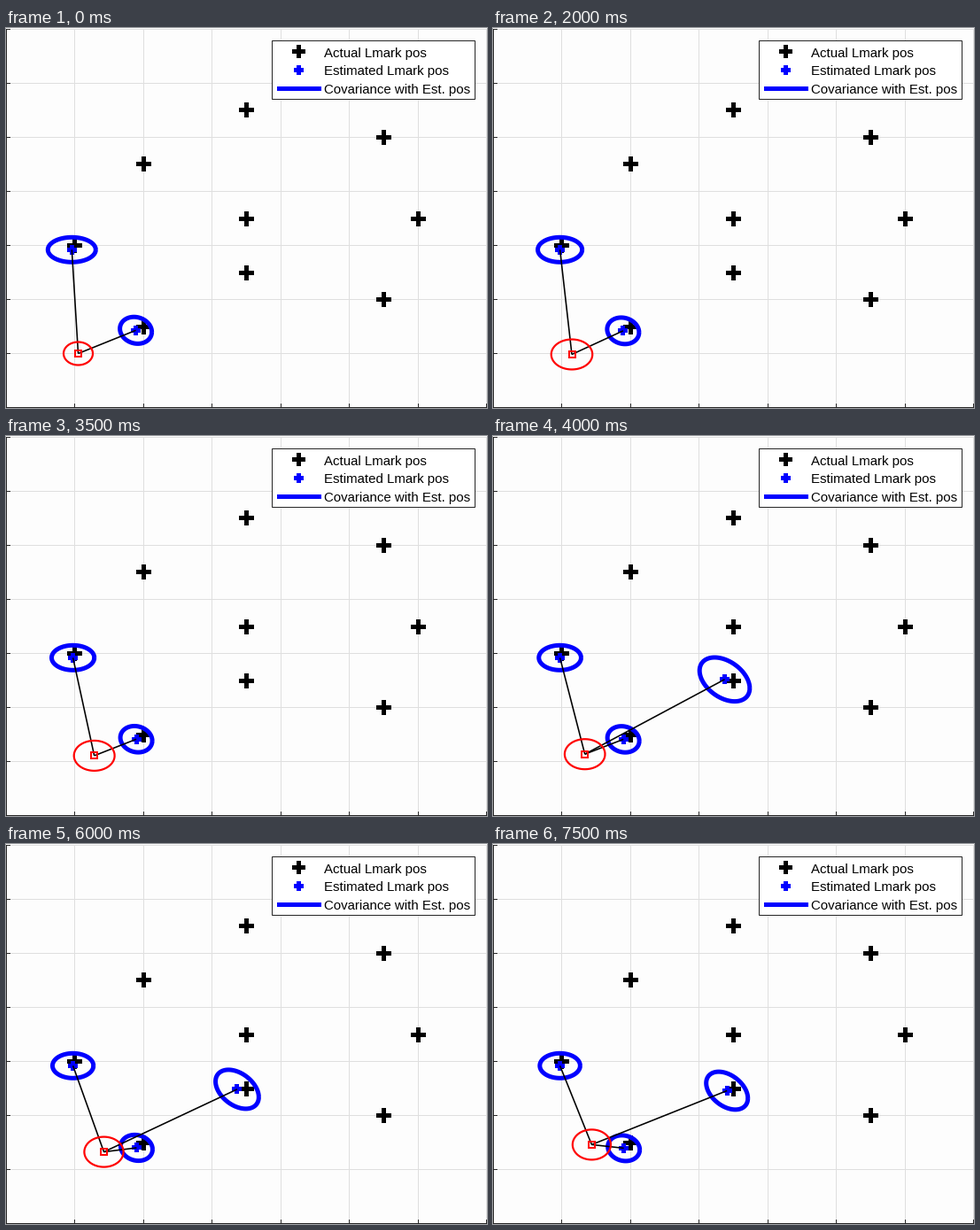
Animation, 543 px wide and 429 px high, one loop 8000 ms. Source, as a matplotlib script:

```python
import numpy as np
import matplotlib.pyplot as plt
from matplotlib.animation import FuncAnimation
from matplotlib.patches import Rectangle

W, H, DPI = 543, 429, 100
PX = 72 / DPI
FRAMES, INTERVAL = 16, 500
BLUE, RED, BLACK, GRID, FRAME = "#0000ff", "#ff0000", "#000000", "#dfdfdf", "#262626"

plt.rcParams["path.snap"] = False
fig = plt.figure(figsize=(W / DPI, H / DPI), dpi=DPI, facecolor="#fdfdfd")
ax = fig.add_axes([0, 0, 1, 1])
ax.set(xlim=(0, W), ylim=(H, 0))
ax.axis("off")


def line(xs, ys, color, width, z):
    return ax.plot(xs, ys, color=color, lw=width * PX, zorder=z,
                   solid_capstyle="butt", solid_joinstyle="miter")[0]


def to_px(u, v):
    """Pixel centre of a point given in grid cells from the top left."""
    return np.floor(77.5 * u) + 0.5, np.round(0.75 + 61.08 * v) + 0.5


def pluses(points, size):
    r, gap = size / 2, np.nan
    xs, ys = [], []
    for x, y in points:
        xs += [x - r, x + r, gap, x, x, gap]
        ys += [y, y, gap, y - r, y + r, gap]
    return xs, ys


def square(x, y, r=3.5):
    sx, sy = np.array([-r, r, r, -r, -r, r]), np.array([-r, -r, r, r, -r, -r])
    return x + sx, y + sy


def ellipse(cx, cy, hx, hy, r=0):
    """Ellipse with half extents hx, hy and correlation r."""
    a = np.linspace(0, 2 * np.pi, 121)
    return cx + hx * np.cos(a), cy + hy * (r * np.cos(a) + np.sqrt(1 - r * r) * np.sin(a))


def pixel(x, y):
    return np.floor(x) + 0.5, np.floor(y) + 0.5


# Grid, axis lines and ticks
for k in range(8):
    x, y = to_px(k, k)
    line([x, x], [1, H], GRID, 1, 1)
    line([0, W], [y, y], GRID, 1, 1)
    line([x, x], [H - 5, H], FRAME, 1, 2)
    line([0, 5], [y, y], FRAME, 1, 2)
line([0.5, 0.5], [1, H], FRAME, 1, 2)
line([0, W], [H - 0.5, H - 0.5], FRAME, 1, 2)

# Actual landmarks, in grid cells
landmarks = [(1, 4), (2, 2.5), (2, 5.5), (3.5, 1.5), (3.5, 3.5),
             (3.5, 4.5), (5.5, 2), (5.5, 5), (6, 3.5)]
line(*pluses([to_px(u, v) for u, v in landmarks], 17), BLACK, 5, 3)

# Legend
ax.add_patch(Rectangle((300.5, 14.5), 229, 66, fc="white", ec=FRAME,
                       lw=PX, zorder=10))
line(*pluses([(330.5, 26.5)], 15), BLACK, 5, 11)
line(*pluses([(330.5, 47.5)], 11), BLUE, 5, 11)
line([306, 356], [68.5, 68.5], BLUE, 5, 11)
labels = ["Actual Lmark pos", "Estimated Lmark pos", "Covariance with Est. pos"]
for label, y in zip(labels, (33, 53, 74)):
    ax.text(359, y, label, family="Liberation Sans", size=15 * PX,
            va="baseline", zorder=11)

# Robot waypoints: seconds, x, y
path_t = [0, 1, 2, 2.5, 4, 6, 7.5]
path_x = [81.5, 84.9, 89, 91.6, 103.7, 110.5, 111.4]
path_y = [367.5, 369.8, 368.5, 364.3, 359.2, 347.6, 339.4]


def robot_pose(t):
    return (np.interp(t, path_t, path_x), np.interp(t, path_t, path_y),
            24.2 - 7.7 * np.exp(-1.7 * t) - 0.35 * t,
            17 - 4 * np.exp(-2.5 * t))


# Estimates settle as they are observed; s is seconds since first sighting
def left_pose(s):
    return 75.6 - 1.3 * np.exp(-3 * s), 250.3, 22 + 5 * np.exp(-s / 4), 14


def low_pose(s):
    return 146.6 + 0.14 * s, 341.3 + 0.28 * s, 18, 15.1 - 0.08 * s, 0.12


def mid_pose(s):
    settle = np.exp(-s / 1.5)
    return (260.5 + 0.7 * (s - 1.2) ** 2, 274.8 + 1.05 * s,
            23 + 5.3 * settle, 21 + 3.8 * settle, 0.4)


sightings = [(0, left_pose), (0, low_pose), (4, mid_pose)]
rings = [line([], [], BLUE, 5, 4) for _ in sightings]
rays = [line([], [], BLACK, 1.6, 6) for _ in sightings]
estimates = line([], [], BLUE, 5, 5)
robot_ring = line([], [], RED, 2.2, 7)
robot = line([], [], RED, 2, 8)


def update(i):
    t = i * INTERVAL / 1000
    body = robot_pose(t)
    rx, ry = body[:2]
    robot.set_data(*square(*pixel(rx, ry)))
    robot_ring.set_data(*ellipse(*body))
    seen = []
    for (start, pose), ring, ray in zip(sightings, rings, rays):
        visible = t >= start
        ring.set_visible(visible)
        ray.set_visible(visible)
        if visible:
            p = pose(t - start)
            seen.append(pixel(*p[:2]))
            ring.set_data(*ellipse(*p))
            ray.set_data([rx, p[0]], [ry, p[1]])
    estimates.set_data(*pluses(seen, 11))
    return [*rings, *rays, estimates, robot_ring, robot]


anim = FuncAnimation(fig, update, frames=FRAMES, interval=INTERVAL,
                     repeat=True, repeat_delay=0, blit=False)
plt.show()
```
